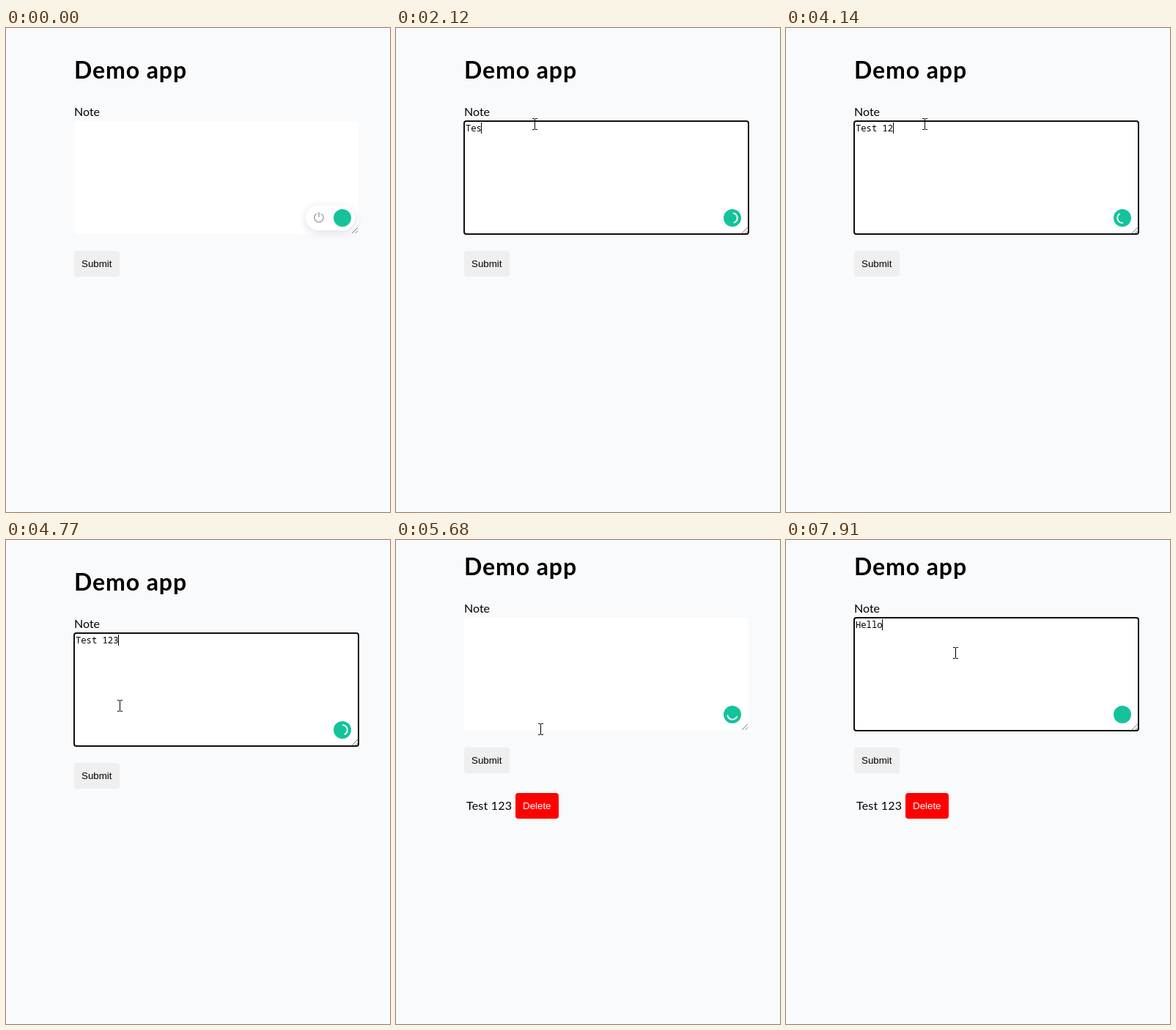
An HTML page with a canvas for the animation above (8 s loop, 524 by 660 pixels).

```html
<!DOCTYPE html>
<html lang="en">
<head>
<meta charset="utf-8">
<title>Demo app</title>
<style>
  html, body { margin: 0; height: 100%; overflow: hidden; background: #f9fafc; }
  canvas { display: block; }
</style>
</head>
<body>
<canvas id="stage" width="524" height="660"></canvas>
<script>
const ctx = document.getElementById('stage').getContext('2d');
const LOOP = 8000, SUBMIT = 5420, SHIFT = -21, CHAR = 7.33;
const SANS = 'Lato, "Open Sans", sans-serif';
const UI = '13.333px "Liberation Sans", Arial, sans-serif';
const MONO = '12.2px "Noto Sans Mono", monospace';

// [time, field text, focused]
const typing = [
  [0, '', false], [850, '', true],
  [1580, 'T', true], [1800, 'Te', true], [2030, 'Tes', true], [2380, 'Test', true],
  [2560, 'Test ', true], [2790, 'Test 2', true], [2990, 'Test 21', true],
  [3300, 'Test 2', true], [3540, 'Test 1', true], [4080, 'Test 12', true], [4380, 'Test 123', true],
  [SUBMIT, '', false], [6160, '', true],
  [6990, 'H', true], [7320, 'He', true], [7520, 'Hel', true], [7650, 'Hell', true], [7910, 'Hello', true]
];
// [time, x, y]
const pointerPath = [
  [130, 250, 557], [740, 180, 184], [890, 180, 184], [1030, 189, 131],
  [4600, 189, 131], [4840, 146, 250], [5080, 123, 318], [5440, 123, 318],
  [5680, 197, 258], [6080, 210, 180], [6230, 210, 180], [6420, 231, 154]
];
const clicks = [[760, 880], [5240, 5410], [6110, 6240]];

const lastBefore = (list, t) => list.filter(k => k[0] <= t).pop();

function pointerAt(t) {
  const a = lastBefore(pointerPath, t);
  if (!a) return null;
  const b = pointerPath[pointerPath.indexOf(a) + 1] || a;
  const p = b === a ? 0 : (t - a[0]) / (b[0] - a[0]);
  const e = p * p * (3 - 2 * p);
  return [Math.round(a[1] + (b[1] - a[1]) * e), Math.round(a[2] + (b[2] - a[2]) * e)];
}

function text(str, x, y, font, color = '#000', spacing = 0) {
  ctx.font = font;
  ctx.letterSpacing = spacing + 'px';
  ctx.fillStyle = color;
  ctx.fillText(str, x, y);
}

function box(x, y, w, h, r, color) {
  ctx.fillStyle = color;
  ctx.beginPath();
  ctx.roundRect(x, y, w, h, r);
  ctx.fill();
}

function disc(x, y, r, color) {
  ctx.fillStyle = color;
  ctx.beginPath();
  ctx.arc(x, y, r, 0, 7);
  ctx.fill();
}

function arc(x, y, r, from, to, color, width) {
  ctx.strokeStyle = color;
  ctx.lineWidth = width;
  ctx.beginPath();
  ctx.arc(x, y, r, from, to);
  ctx.stroke();
}

function line(x1, y1, x2, y2, color, width = 1) {
  ctx.strokeStyle = color;
  ctx.lineWidth = width;
  ctx.beginPath();
  ctx.moveTo(x1, y1);
  ctx.lineTo(x2, y2);
  ctx.stroke();
}

function helperPill() {
  ctx.save();
  ctx.shadowColor = 'rgba(40, 50, 90, .16)';
  ctx.shadowBlur = 12;
  ctx.shadowOffsetY = 3;
  box(409, 242, 67, 34, 17, '#fff');
  ctx.restore();
  arc(427, 258.5, 6.2, -1.05, 4.19, '#80868f', 1.1);
  line(427, 251, 427, 258, '#80868f', 1.1);
}

function spinner(t) {
  const mid = (90 - 0.275 * (t - 3090)) * Math.PI / 180;
  ctx.lineCap = 'round';
  arc(459, 259, 6.8, mid - 1.25, mid + 1.25, '#e4f8f2', 2);
  ctx.lineCap = 'butt';
}

function field(t) {
  const [since, value, focused] = lastBefore(typing, t);
  box(93, 127, 388, 154, 3, '#fff');
  if (focused) {
    ctx.strokeStyle = '#101010';
    ctx.lineWidth = 2;
    ctx.beginPath();
    ctx.roundRect(93, 127, 388, 154, 3);
    ctx.stroke();
  }
  text(value, 95, 141, MONO);
  if (focused && (t - since) % 1000 < 500) {
    ctx.fillStyle = '#000';
    ctx.fillRect(Math.floor(95 + CHAR * value.length), 129, 1, 15);
  }
  if (t < 1580) helperPill();
  line(472, 280, 480, 272, '#777');
  line(476.5, 280, 480, 276.5, '#777');
  disc(459, 259, 12, '#15c39a');
  if (t >= 1580 && t < 6440) spinner(t);
}

function ibeam(x, y) {
  ctx.fillStyle = '#000';
  ctx.fillRect(x, y - 7, 1, 14);
  for (const edge of [y - 8, y + 7]) {
    ctx.fillRect(x - 3, edge, 3, 1);
    ctx.fillRect(x + 1, edge, 3, 1);
  }
}

function shape(path, x, y) {
  ctx.save();
  ctx.translate(x, y);
  const p = new Path2D(path);
  ctx.fillStyle = '#fff';
  ctx.fill(p);
  ctx.strokeStyle = '#000';
  ctx.lineWidth = 1;
  ctx.stroke(p);
  ctx.restore();
}

const ARROW = 'M.5 .5V16.5L4.2 13L6.7 18.5L9 17.5L6.6 12H11.5Z';
const HAND = 'M0 1.5Q1.5-.5 3 1.5V8Q4.5 6 6 8Q7.7 6.5 9 8.7Q11.5 7.5 12 10V16Q11.5 19 10 20V22.5H2V20' +
  'L-4.5 13Q-5.5 10.5-3 11L0 13.5ZM3 7.5V11M6 8V11.5M9 8.7V12';

function pointer(t, shift) {
  const at = pointerAt(t);
  if (!at) return;
  const [x, y] = at;
  if (clicks.some(([from, to]) => t >= from && t < to)) {
    ctx.globalCompositeOperation = 'multiply';
    disc(x + 1, y, 12, '#fffa5a');
    ctx.globalCompositeOperation = 'source-over';
  }
  const inside = (l, top, r, b) => x >= l && x <= r && y >= top + shift && y <= b + shift;
  if (inside(93, 127, 481, 281)) ibeam(x, y);
  else if (inside(93, 304, 155, 339)) shape(HAND, x, y);
  else shape(ARROW, x, y);
}

function draw() {
  const t = performance.now() % LOOP;
  const submitted = t >= SUBMIT, shift = submitted ? SHIFT : 0;
  ctx.fillStyle = '#f9fafc';
  ctx.fillRect(0, 0, 524, 660);

  ctx.save();
  ctx.translate(0, shift);
  text('Demo app', 93, 69, 'bold 32px ' + SANS, '#000', 0.9);
  text('Note', 93, 120, '16px ' + SANS);
  field(t);
  box(93, 304, 62, 35, 4, '#efefef');
  text('Submit', 103, 326, UI);
  ctx.restore();

  if (submitted) {
    text('Test 123', 96, 368, '16px ' + SANS, '#000', 0.2);
    box(163, 345, 59, 35, 4, '#f00');
    text('Delete', 173, 367, UI, '#fff');
  }
  pointer(t, shift);
  requestAnimationFrame(draw);
}
draw();
</script>
</body>
</html>
```
